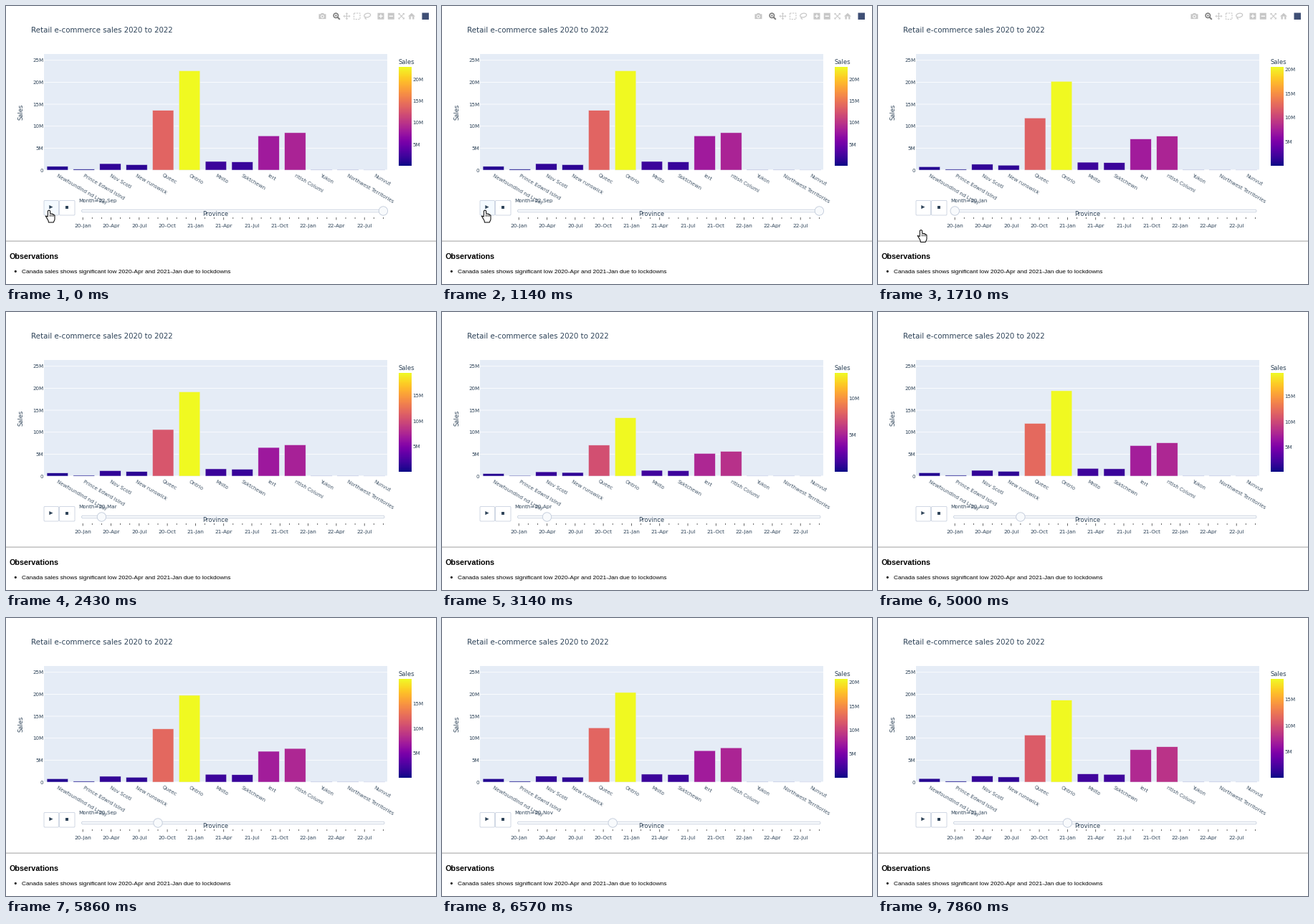
Animation of 600 by 388 pixels, one loop 8 s. Source, as a matplotlib script:

```python
import numpy as np
import matplotlib.pyplot as plt
from matplotlib.animation import FuncAnimation
from matplotlib.collections import LineCollection
from matplotlib.patches import Circle, Ellipse, FancyBboxPatch, Polygon, Rectangle

W, H, DPI = 600, 388, 100
LOOP, STEP = 8000, 50
PX = 72 / DPI

INK = "#2f4459"
BORDER = "#bec8d9"
PANEL = "#e5ecf6"
ICON = "#c7c7c7"
DARK_ICON = "#7c7c7c"

# Playback timing in ms
PLAY_AT, MONTH_MS, BAR_LAG = 1265, 516, 70
LEAVE_AT, LEAVE_MS = 1400, 600

LEFT, RIGHT, TOP, BASE = 53, 532, 67, 229
PX_PER_M = 6.13
CB_LEFT, CB_RIGHT, CB_TOP, CB_BASE = 548, 565.6, 85.4, 223
SLIDE_X, SLIDE_DX, SLIDE_Y = 107.2, 13.1, 286
LAST_MONTH = 32
MONTHS = "Jan Feb Mar Apr May Jun Jul Aug Sep Oct Nov Dec".split()

# Typical monthly sales in millions
TYPICAL = {
    "Newfoundlnd nd Lrdor": 0.77, "Prince Edwrd Islnd": 0.19, "Nov Scoti": 1.34,
    "New runswick": 1.12, "Queec": 12.35, "Ontrio": 20.4, "Mnito": 1.8,
    "Ssktchewn": 1.7, "lert": 7.15, "ritish Columi": 7.8, "Yukon": 0.07,
    "Northwest Territories": 0.07, "Nunvut": 0.03,
}
SLOT = (RIGHT - LEFT) / len(TYPICAL)

# Turning points of demand: two lockdown dips, then slow growth
TURNS = [0, 2, 3, 4, 5, 10, 12, LAST_MONTH]
DEMAND = [0.99, 0.91, 0.72, 0.84, 0.95, 1, 1.03, 1.09]
LOCAL_DEMAND = {
    "Ontrio": [0.99, 0.94, 0.65, 0.725, 0.92, 1, 0.914, 1.108],
    "Queec": [0.96, 0.858, 0.57, 0.785, 0.95, 1, 0.866, 1.1],
}

fig = plt.figure(figsize=(W / DPI, H / DPI), dpi=DPI, facecolor="white")
ax = fig.add_axes([0, 0, 1, 1])


def add(patch, z=2):
    patch.set_zorder(z)
    return ax.add_patch(patch)


def text(x, y, s, size=7.2, color=INK, font="DejaVu Sans", **kw):
    kw.setdefault("va", "baseline")
    kw.setdefault("zorder", 4)
    return ax.text(x, y, s, fontsize=size * PX, color=color, family=font, **kw)


def box(x, y, w, h, fill, z=2):
    return add(Rectangle((x, y), w, h, fc=fill, lw=0, snap=False), z)


def round_box(x, y, w, h, r, fill="white"):
    style = f"round,pad=0,rounding_size={r}"
    return add(FancyBboxPatch((x, y), w, h, boxstyle=style, fc=fill,
                              ec=BORDER, lw=0.7 * PX), 3)


def shape(points, color, z=2):
    return add(Polygon(points, fc=color, lw=0), z)


def ring(x, y, r, color, lw):
    return add(Circle((x, y), r, fc="none", ec=color, lw=lw * PX))


def lines(segments, color, lw=1.0, z=2):
    coll = LineCollection(segments, colors=color, linewidths=lw * PX, zorder=z)
    coll.set_snap(False)
    return ax.add_collection(coll)


def month_name(k):
    return f"{20 + k // 12}-{MONTHS[k % 12]}"


def month_at(t):
    return int((t - PLAY_AT) // MONTH_MS) if t >= PLAY_AT else LAST_MONTH


def sales_at(k):
    return [typical * np.interp(k, TURNS, LOCAL_DEMAND.get(name, DEMAND))
            for name, typical in TYPICAL.items()]


def draw_plot():
    box(LEFT, TOP, RIGHT - LEFT, BASE - TOP, PANEL, z=0)
    for v in range(0, 30, 5):
        y = BASE - v * PX_PER_M
        lines([[(LEFT, y), (RIGHT, y)]], "white", 0.8 if v else 1.2, 1)
        text(52.5, y + 2.6, f"{v}M" if v else "0", ha="right")
    text(35, 37, "Retail e-commerce sales 2020 to 2022", 10.2)
    text(20.8, 148, "Sales", 8.4, rotation=90, ha="center", va="center")
    text(292.3, 293.2, "Province", 8.4, ha="center", zorder=6)
    text(547.5, 81.2, "Sales", 8.5)
    for i, name in enumerate(TYPICAL):
        text(LEFT + (i + 0.5) * SLOT - 1.5, 237.5, name, rotation=-30,
             rotation_mode="anchor", ha="left", alpha=0.9)
    ramp = np.linspace(1, 0, 138)[:, None]
    ax.imshow(ramp, cmap="plasma", extent=(CB_LEFT, CB_RIGHT, CB_BASE, CB_TOP),
              aspect="auto", interpolation="nearest", zorder=2)


def draw_slider():
    ticks = []
    for k in range(LAST_MONTH + 1):
        x = SLIDE_X + k * SLIDE_DX
        ticks.append([(x, 295), (x, 297 if k % 3 else 298.5)])
        if k % 3 == 0:
            text(x, 309, month_name(k), 7.4, ha="center")
    lines(ticks, "#444444", 0.8)
    round_box(105.5, 284.2, 422.5, 3.6, 1.7, "#f8fafc")


def draw_notes():
    lines([[(0, 328.1), (W, 328.1)]], "#a0a0a0")
    text(4.7, 353.3, "Observations", 10.75, "black", "Liberation Sans", weight="bold")
    add(Circle((13.3, 370.4), 1.5, fc="black", lw=0))
    text(22, 373, "Canada sales shows significant low 2020-Apr and 2021-Jan "
         "due to lockdowns", 8.33, "black", "Liberation Sans")


def arrows(x, y, reach, turn):
    parts = []
    for q in range(4):
        a = turn + q * np.pi / 2
        u, n = np.array([np.cos(a), np.sin(a)]), np.array([-np.sin(a), np.cos(a)])
        tip, neck = (x, y) + u * reach, (x, y) + u * (reach - 2)
        parts.append(lines([[(x, y), neck]], ICON))
        parts.append(shape([tip, neck + n * 1.9, neck - n * 1.9], ICON))
    return parts


def zoom_box(x, y, plus):
    signs = [[(x - 2.7, y), (x + 2.7, y)]]
    if plus:
        signs.append([(x, y - 2.7), (x, y + 2.7)])
    return [box(x - 4.5, y - 4.5, 9, 9, ICON), lines(signs, "white", 1.4, 3)]


def draw_toolbar():
    y = 14.2
    camera = [box(436.5, 11.3, 10, 6.8, ICON), box(439.5, 10, 4, 2, ICON),
              add(Circle((441.5, 14.7), 2.4, fc="white", lw=0), 3),
              add(Circle((441.5, 14.7), 1.4, fc=ICON, lw=0), 4)]
    magnifier = [ring(460.3, 13.3, 3.2, DARK_ICON, 1.6),
                 lines([[(462.6, 15.6), (465.8, 18.8)]], DARK_ICON, 2),
                 lines([[(458.8, 13.3), (461.8, 13.3)],
                        [(460.3, 11.8), (460.3, 14.8)]], DARK_ICON, 0.9)]
    select = add(Rectangle((485.5, 10), 8.5, 8.5, fc="none", ec=ICON, lw=1.1 * PX,
                           ls=(0, (2, 1.2)), snap=False))
    lasso = [add(Ellipse((504.2, 13), 9, 5.5, angle=-12, fc="none", ec=ICON, lw=1.2 * PX)),
             lines([[(501.5, 15.3), (501, 17), (503, 18.5)]], ICON, 1.2)]
    home = [shape([(561, 14.5), (566, 9.8), (571, 14.5)], ICON),
            box(562.5, 14.3, 2.3, 4.2, ICON), box(567.2, 14.3, 2.3, 4.2, ICON)]
    return (camera + magnifier + [select] + lasso + home
            + arrows(475.5, y, 5, 0) + arrows(551.7, y, 6, np.pi / 4)
            + zoom_box(523, y, True) + zoom_box(537.3, y, False)
            + [box(580.5, 9.5, 9.5, 9.5, "#3f4f75")])


draw_plot()
draw_slider()
draw_notes()
toolbar = draw_toolbar()

bars = [add(Rectangle((LEFT + (i + 0.1) * SLOT + 0.4, BASE), 0.8 * SLOT, 0,
                      ec=PANEL, lw=0.5 * PX, snap=False))
        for i in range(len(TYPICAL))]
scale_labels = {v: text(567.3, 0, f"{v}M") for v in (5, 10, 15, 20)}

play = round_box(53, 271.5, 20.5, 20.5, 1.2)
round_box(74.5, 271.5, 21.5, 20.5, 1.2)
shape([(60.3, 278), (65.5, 280.6), (60.3, 283.2)], INK, 4)
box(83, 279, 4, 4, INK, 4)
handle = add(Circle((0, SLIDE_Y), 6.2, fc="#f8fafc", ec=BORDER, lw=0.8 * PX), 5)
month_label = text(101, 274.4, "")

HAND = np.array([(0, 0), (-1.6, 1), (-1.6, 9), (-4.8, 8), (-1, 14.5), (-0.6, 17),
                 (6.3, 17), (8, 13), (8, 7.2), (4.6, 5), (1.6, 4.8), (1.6, 1)])
HOME = np.array([60, 285])
hand = add(Polygon(HAND + HOME, fc="white", ec="black", lw=PX, joinstyle="round"), 9)
knuckles = lines([], "black", 0.8, 10)

ax.set_xlim(0, W)
ax.set_ylim(H, 0)
ax.axis("off")


def update(frame):
    t = frame * STEP
    k = month_at(t)
    handle.center = (SLIDE_X + k * SLIDE_DX, SLIDE_Y)
    month_label.set_text("Month=" + month_name(k))

    values = sales_at(month_at(t - BAR_LAG))
    peak = max(values)
    for bar, v in zip(bars, values):
        bar.set_y(BASE - v * PX_PER_M)
        bar.set_height(v * PX_PER_M)
        bar.set_facecolor(plt.cm.plasma(v / peak))
    for v, label in scale_labels.items():
        share = v / (peak * 1.01)
        label.set_y(CB_BASE - share * (CB_BASE - CB_TOP) + 2.7)
        label.set_visible(share <= 1)

    # The pointer leaves through the bottom edge
    p = np.clip((t - LEAVE_AT) / LEAVE_MS, 0, 1)
    tip = HOME + (0, 110 * p * p)
    hand.set_xy(HAND + tip)
    knuckles.set_segments([[tip + (x, 6), tip + (x, 9)] for x in (1.6, 3.9, 6)])
    play.set_facecolor("#f4faff" if tip[1] < 292 else "white")
    for part in toolbar:
        part.set_visible(bool(tip[1] < 328))
    return []


anim = FuncAnimation(fig, update, frames=LOOP // STEP, interval=STEP,
                     repeat=True, repeat_delay=0, blit=False)
plt.show()
```
